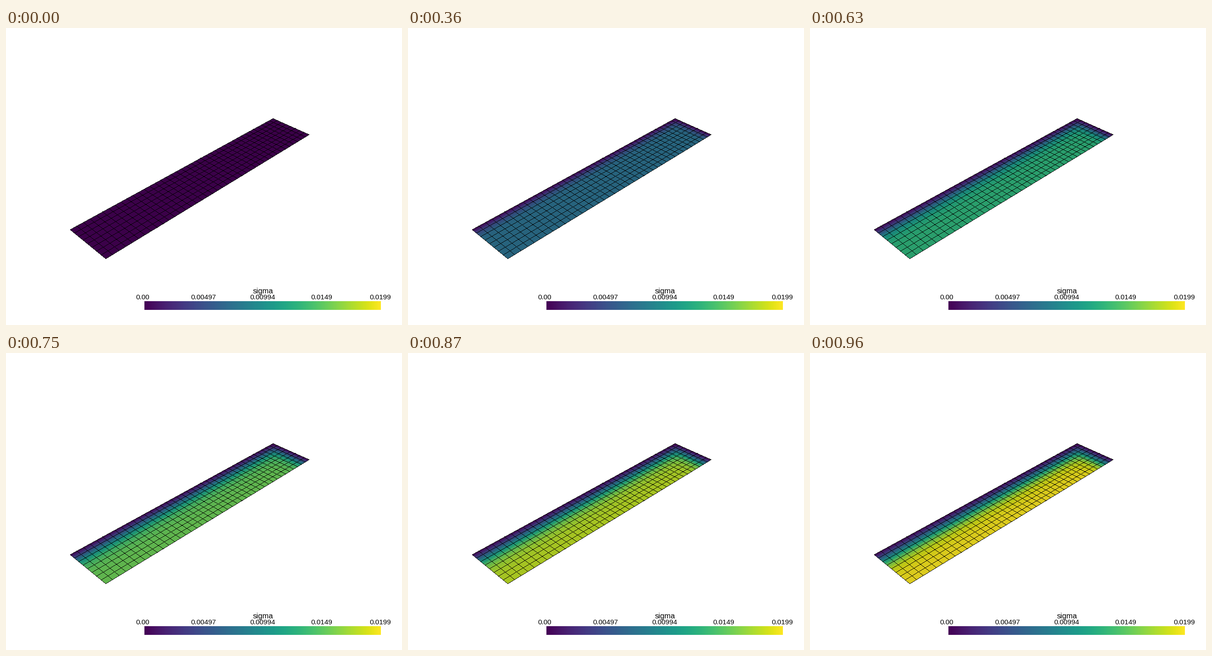
A matplotlib script that plays this animation: 864x648 px, repeating every 990 ms.

```python
import numpy as np
import matplotlib.pyplot as plt
from matplotlib.animation import FuncAnimation

W, H, DPI = 864, 648, 100
FRAMES, STEP_MS = 33, 30
NX, NY = 40, 8                      # cells along and across the strip
ASPECT = 0.1845                     # width / length
SHADE = 0.88                        # lighting on the surface

# Isometric perspective camera, bounding radius 1, view angle 30 degrees
A = 1 / np.hypot(1, ASPECT)
B = A * ASPECT
DIST = 1 / np.sin(np.radians(15))
FOCAL = 0.997 * (H / 2) / np.tan(np.radians(15))
R2, R3, R6 = np.sqrt([2, 3, 6])
CMAP = plt.get_cmap("viridis")


def project(x, y):
    depth = DIST - (x + y) / R3
    return (W / 2 - FOCAL * (x - y) / R2 / depth,
            H / 2 + FOCAL * (x + y) / R6 / depth)


def unproject(px, py):
    u, v = (px - W / 2) / FOCAL, (H / 2 - py) / FOCAL
    total = v * DIST / (v / R3 - 1 / R6)
    diff = -R2 * u * (DIST - total / R3)
    return (total + diff) / 2, (total - diff) / 2


# Cell coordinates of every pixel that lies on the strip
py, px = np.mgrid[0:H, 0:W] + 0.5
gx, gy = unproject(px, py)
gx = (gx + A) / (2 * A) * NX
gy = (gy + B) / (2 * B) * NY
inside = (gx >= 0) & (gx <= NX) & (gy >= 0) & (gy <= NY)
gx, gy = gx[inside], gy[inside]
ix = np.minimum(gx.astype(int), NX - 1)
iy = np.minimum(gy.astype(int), NY - 1)
fx, fy = gx - ix, gy - iy

# Mesh lines exactly one pixel wide
mesh = np.zeros((H, W), bool)


def draw_line(start, end):
    (x0, y0), (x1, y1) = project(*start), project(*end)
    count = int(max(abs(x1 - x0), abs(y1 - y0))) + 2
    xs, ys = np.linspace(x0, x1, count), np.linspace(y0, y1, count)
    if abs(x1 - x0) >= abs(y1 - y0):
        cols = np.arange(int(min(x0, x1)), int(max(x0, x1)) + 1)
        rows = y0 + (cols + 0.5 - x0) * (y1 - y0) / (x1 - x0)
    else:
        cols, rows = xs, ys
    mesh[np.floor(rows).astype(int), np.floor(cols).astype(int)] = True


for x in np.linspace(-A, A, NX + 1):
    draw_line((x, -B), (x, B))
for y in np.linspace(-B, B, NY + 1):
    draw_line((-A, y), (A, y))

# Stress limit at the nodes, rising from the two free edges
dx, dy = np.meshgrid(np.arange(NX + 1.0), np.arange(NY + 1.0), indexing="ij")
dx, dy = np.maximum(dx, 1e-3), np.maximum(dy, 1e-3)
edge_dist = (dx ** -4 + dy ** -4) ** -0.25
limit = 0.24 * edge_dist ** 1.25


def nodal_stress(load):
    if load == 0:
        return np.zeros_like(limit)
    ratio = limit / load
    return load * ratio / (1 + ratio ** 3.5) ** (1 / 3.5)


def surface(load):
    s = nodal_stress(load)
    near = s[ix, iy] * (1 - fy) + s[ix, iy + 1] * fy
    far = s[ix + 1, iy] * (1 - fy) + s[ix + 1, iy + 1] * fy
    img = np.ones((H, W, 3))
    img[inside] = CMAP(near * (1 - fx) + far * fx)[:, :3] * SHADE
    img[mesh] = 0
    return img


fig = plt.figure(figsize=(W / DPI, H / DPI), dpi=DPI, facecolor="white")
ax = fig.add_axes([0, 0, 1, 1])
ax.axis("off")

picture = ax.imshow(surface(0), extent=(0, W, H, 0), aspect="auto",
                    interpolation="nearest", zorder=1)
ax.imshow(np.linspace(0, 1, 256)[None, :], cmap=CMAP, aspect="auto",
          extent=(302, 818, 615, 596), interpolation="nearest", zorder=2)


def label(x, y, text, size):
    ax.text(x, y, text, fontsize=size * 72 / DPI, family="Liberation Sans",
            ha="center", va="baseline", color="black", zorder=4)


label(561, 579, "sigma", 16.5)
for x, text in [(298, "0.00"), (431.3, "0.00497"), (559.7, "0.00994"),
                (689, "0.0149"), (817, "0.0199")]:
    label(x, 592, text, 15.3)

ax.set_xlim(0, W)
ax.set_ylim(H, 0)


def update(i):
    picture.set_data(surface(i / (FRAMES - 1)))
    return [picture]


anim = FuncAnimation(fig, update, frames=FRAMES, interval=STEP_MS,
                     init_func=lambda: update(0), repeat=True, repeat_delay=0)
plt.show()
```
